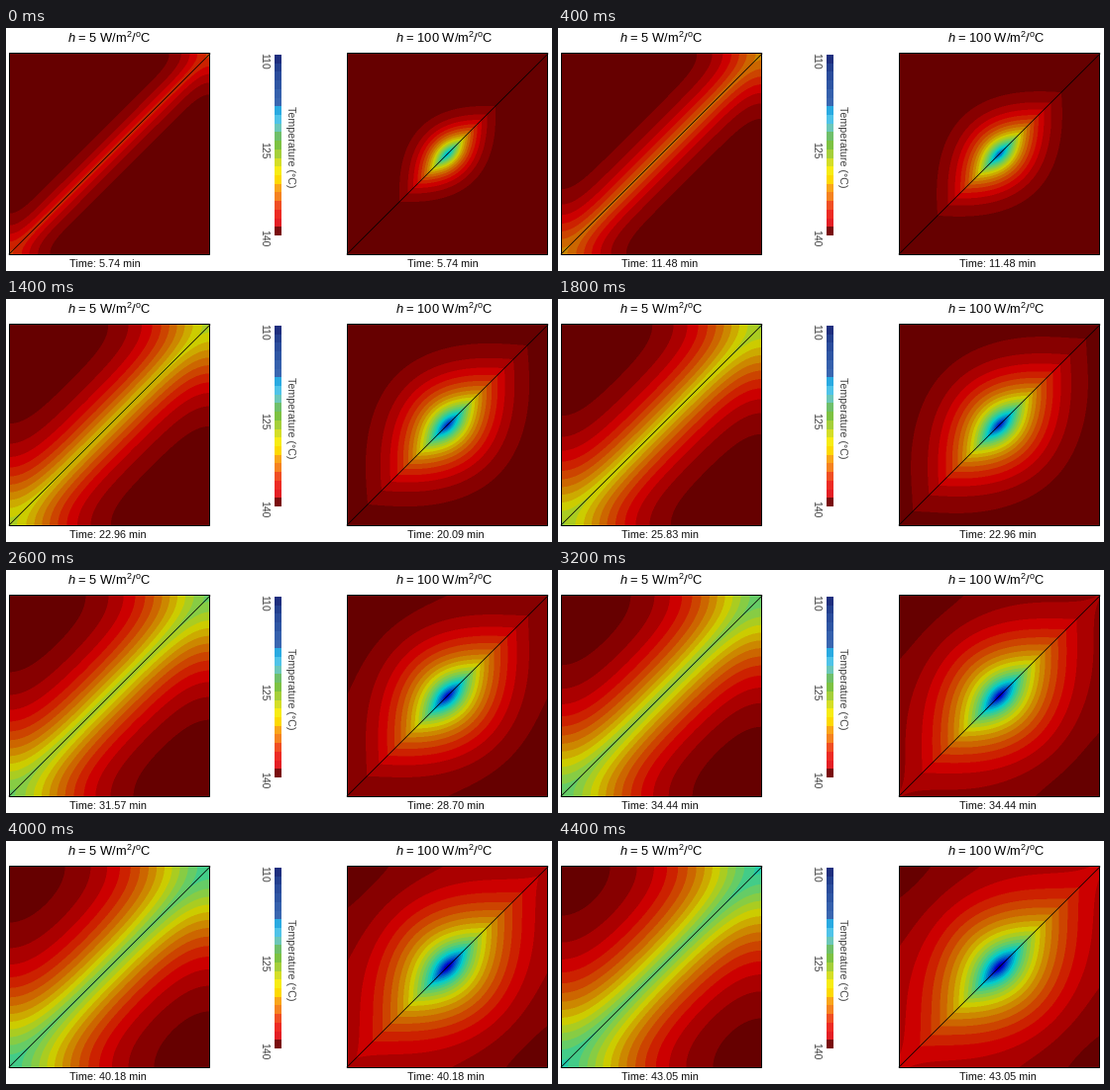
Write a matplotlib script that moves like this. It is 551 px wide and 246 px high and loops after 4.6 s.

```python
import math
import numpy as np
import matplotlib.pyplot as plt
from matplotlib.animation import FuncAnimation
from matplotlib.patches import Rectangle

plt.rcParams.update({
    "font.family": "Liberation Sans",
    "mathtext.fontset": "custom",
    "mathtext.rm": "Liberation Sans",
    "mathtext.it": "Liberation Sans:italic",
})

W, H, DPI = 551, 246, 100
PX = 72 / DPI
SIDE, TOP = 203, 26
LEFT, RIGHT = 3, 344
FRAMES, STEP = 23, 2.87
BANDS = 25
WALL = 0.45  # share of the field reflected by the outer walls

# Diffusion profiles for a steady flux and for a steady temperature
Z = np.linspace(0, 5, 1500)
ERFC = np.array([math.erfc(z) for z in Z])
FLUX = np.exp(-Z * Z) - math.sqrt(math.pi) * Z * ERFC


def jet(v):
    rgb = [1.5 - abs(4 * v - c) for c in (3, 2, 1)]
    return 0.8 * np.clip(np.stack(rgb, axis=-1), 0, 1)


PALETTE = jet(np.arange(BANDS)[::-1] / (BANDS - 1))

# Two samples per pixel, averaged when painted
grid = (np.arange(2 * SIDE) + 0.5) / 2
X, Y = np.meshgrid(grid, grid)


def paint(depth):
    rgb = PALETTE[np.clip(depth.astype(int), 0, BANDS - 1)]
    return rgb.reshape(SIDE, 2, SIDE, 2, 3).mean(axis=(1, 3))


def lens_distance(dx, dy):
    """Size of the lens p = w (1 - (u / U(w))^2) passing through each point."""
    u = (dx - dy) / math.sqrt(2)
    p = np.abs(dx + dy) / math.sqrt(2)
    c = 0.0648 * u * u
    w = p + c ** (1 / 1.568) + 1e-3
    for _ in range(8):
        gap = w - p - c * w ** -0.568
        w = np.maximum(w - gap / (1 + 0.568 * c * w ** -1.568), 1e-3)
    return w


def mirrored(d):
    return [(d, 1), (SIDE - d, WALL), (-SIDE - d, WALL)]


LENSES = [(lens_distance(dx, dy), kx * ky)
          for dx, kx in mirrored(X - SIDE / 2)
          for dy, ky in mirrored(Y - SIDE / 2)]
CORE = 10.5 * np.exp(-LENSES[0][0] / 11.5)

ACROSS = np.minimum(X + Y, 2 * SIDE - X - Y) / SIDE
ALONG = np.abs(X - Y) / SIDE


def strip(t):
    peak = 1.92 * math.sqrt(t)
    reach = SIDE / math.sqrt(2) / (13.25 * math.sqrt(t))
    a, b = (np.interp((1 - s) * reach, Z, FLUX) + np.interp((1 + s) * reach, Z, FLUX)
            for s in (ACROSS, ALONG))
    return peak * (a + b - 0.85 * a * b)


def lens(t):
    peak = 0.73 + 3.3 * math.log(t)
    spread = 13.48 * math.sqrt(t)
    return CORE + peak * sum(k * np.interp(w / spread, Z, ERFC) for w, k in LENSES)


times = [STEP * (k + 2) for k in range(14)]
strips = [paint(strip(t)) for t in times]
lenses = [paint(lens(t)) for t in times]

fig = plt.figure(figsize=(W / DPI, H / DPI), dpi=DPI, facecolor="white")
ax = fig.add_axes([0, 0, 1, 1])
ax.axis("off")


def label(x, y, s, px, **kw):
    return ax.text(x, y, s, fontsize=px * PX, **kw)


def panel(x, title, center):
    img = ax.imshow(strips[0], extent=(x, x + SIDE, TOP + SIDE, TOP),
                    interpolation="nearest", aspect="auto", vmin=0, vmax=1)
    ax.plot([x, x + SIDE], [TOP + SIDE, TOP], color="black", lw=0.75 * PX)
    ax.add_patch(Rectangle((x, TOP - 1), SIDE - 1, SIDE + 1, fill=False, ec="black", lw=PX))
    label(center, 15, title, 12.9, ha="center", va="baseline")
    clock = label(x + 61, 242, "", 10.9, va="baseline", color="#111111")
    return img, clock


unit = r" W/m$^\mathrm{2}$/$^\mathrm{o}$C"
left = panel(LEFT, r"$\mathit{h}$ = 5" + unit, 104)
right = panel(RIGHT, r"$\mathit{h}$ = 100" + unit, 442.5)

BAR = ("#1f2f7f #24408f #2a4c9b #2e55a3 #3560ac #3a66b0 #29aae1 #4fc3e8 #6cc7b9 "
       "#6fbf6a #7dc242 #a5cf3a #d4de27 #f7ec13 #fdd900 #f9a51a #f58220 #f04e23 "
       "#ed2b24 #e41f25 #7a0c0e").split()
cell = 183 / len(BAR)
for i, color in enumerate(BAR):
    ax.add_patch(Rectangle((271, 27 + i * cell), 7, cell, fc=color, lw=0))

side = dict(rotation=270, ha="center", va="center", color="#404040")
for y, s in ((33, "110"), (124, "125"), (213, "140")):
    label(260, y, s, 10.4, **side)
label(287, 120.5, "Temperature (°C)", 10.6, **side)

ax.set_xlim(0, W)
ax.set_ylim(H, 0)


def show(part, images, k):
    img, clock = part
    img.set_data(images[k])
    clock.set_text(f"Time: {times[k]:.2f} min")


def update(i):
    # Both panels advance together at first, then take turns
    show(left, strips, i if i < 5 else 4 + (i - 3) // 2)
    show(right, lenses, i if i < 5 else 4 + (i - 4) // 2)
    return [*left, *right]


def init():
    return update(0)


anim = FuncAnimation(fig, update, frames=FRAMES, init_func=init,
                     interval=200, repeat=True, repeat_delay=0, blit=False)
plt.show()
```
